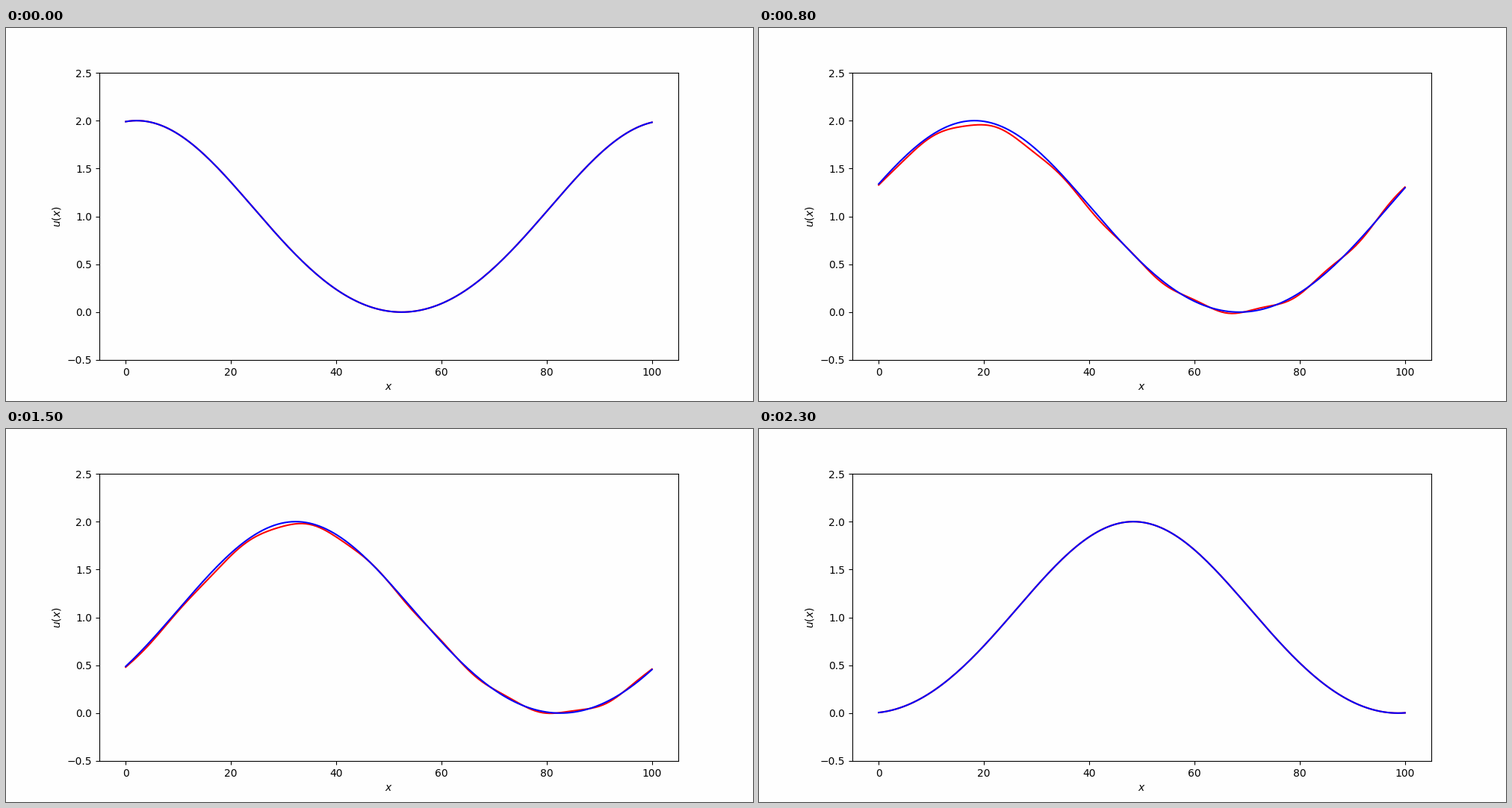
Animation, 1000 px wide and 500 px high, one loop 2400 ms. Source, as a matplotlib script:

```python
import numpy as np
import matplotlib.pyplot as plt
from matplotlib.animation import FuncAnimation

FRAMES = 24
PERIOD = 100.65  # wavelength
START = 2.1      # first crest position
SPEED = 2.013    # crest shift per frame
SHARPNESS = 0.05  # narrows crests, widens troughs

x = np.linspace(0, 100, 150)


def wave(k):
    """Travelling wave between 0 and 2 with a weak second harmonic."""
    theta = 2 * np.pi * (x - START - SPEED * k) / PERIOD
    return 1 + np.cos(theta) - SHARPNESS * (1 - np.cos(2 * theta))


def error_size(k):
    """Rises from zero, peaks just before the middle, returns to zero."""
    s = k / (FRAMES - 1)
    return s ** 2 * (1 - s) ** 2.5 / 0.0455


# Standing error of the approximation: a broad dip plus growing ripples
dip = -0.045 * np.exp(-((x - 23) / 22) ** 2)
ripple = (0.01 + 0.00015 * x) * np.cos(2 * np.pi * (x - 10) / 12.5)
error = dip + ripple

fig, ax = plt.subplots(figsize=(10, 5), dpi=100, facecolor="#fefefe")
ax.set_facecolor("#fefefe")
ax.set(xlim=(-5, 105), ylim=(-0.5, 2.5), xlabel="$x$", ylabel="$u(x)$")
approx, = ax.plot([], [], color="red", lw=1.5)
exact, = ax.plot([], [], color="blue", lw=1.5)


def update(k):
    u = wave(k)
    approx.set_data(x, u + error_size(k) * error)
    exact.set_data(x, u)
    return approx, exact


anim = FuncAnimation(fig, update, frames=FRAMES, interval=100,
                     init_func=lambda: update(0), repeat=True, repeat_delay=0)
plt.show()
```
